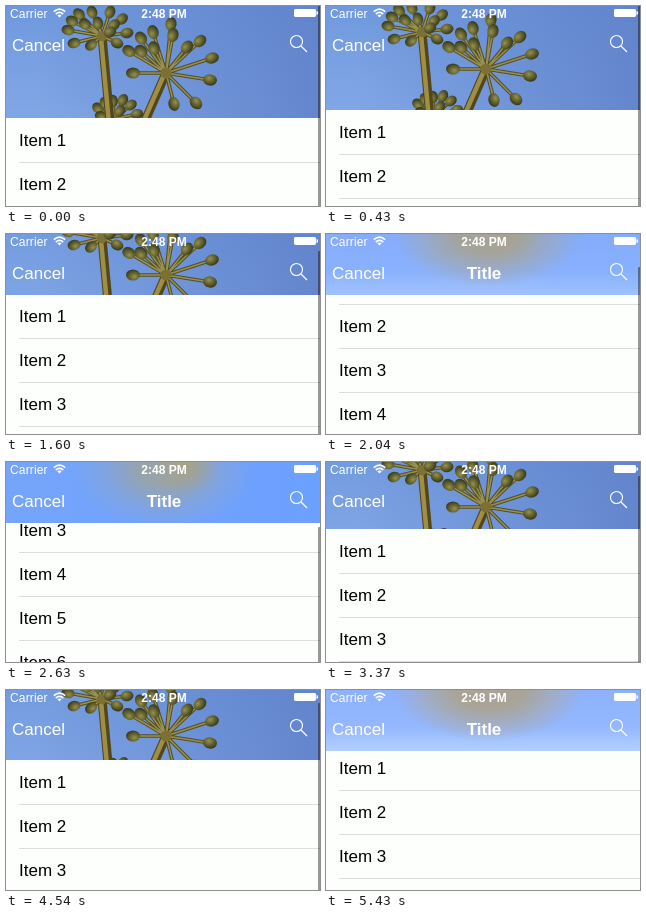
Recreate the animation shown at these times as an HTML page. Size 314x200 px, loop 5990 ms.

```html
<!DOCTYPE html>
<html lang="en">
<head>
<meta charset="utf-8">
<title>Collapsing header</title>
<style>
@property --scroll { syntax: "<number>"; inherits: true; initial-value: 0; }
@property --blur { syntax: "<number>"; inherits: true; initial-value: 0; }
@property --bar { syntax: "<number>"; inherits: true; initial-value: 1; }

html, body { margin: 0; width: 100%; height: 100%; overflow: hidden; background: #fdfffd; }
body {
  position: relative;
  font: 17px/43px "Liberation Sans", Arial, sans-serif;
  animation: scroll 5990ms infinite, blur 5990ms infinite, bar 5990ms infinite;
}

@keyframes scroll {
  0% { --scroll: 0; animation-timing-function: steps(7); }
  17.02% { --scroll: 28; animation-timing-function: steps(4); }
  26.7% { --scroll: 52; animation-timing-function: steps(4); }
  36.55% { --scroll: 120; animation-timing-function: steps(3); }
  43.9% { --scroll: 154; animation-timing-function: steps(1); }
  46.4% { --scroll: 146; animation-timing-function: steps(4); }
  56.25% { --scroll: 45; animation-timing-function: steps(2); }
  61.09% { --scroll: 20; animation-timing-function: steps(3); }
  68.44% { --scroll: 7; animation-timing-function: steps(2); }
  73.28% { --scroll: 30; animation-timing-function: steps(2); }
  78.29% { --scroll: 54; animation-timing-function: steps(1); }
  80.79%, 100% { --scroll: 56; }
}
@keyframes blur {
  0% { --blur: 0; }
  26.7% { --blur: 0; animation-timing-function: steps(2); }
  31.7% { --blur: 1; }
  51.4% { --blur: 1; animation-timing-function: steps(2); }
  56.25% { --blur: 0; }
  75.8% { --blur: 0; animation-timing-function: steps(2); }
  80.79%, 100% { --blur: 1; }
}
@keyframes bar {
  0% { --bar: 1; }
  83.3% { --bar: 1; animation-timing-function: steps(3); }
  90.64%, 100% { --bar: 0; }
}

#list { position: absolute; left: 13px; right: 0; top: calc((113 - var(--scroll)) * 1px); color: #000; }
#list div { height: 43px; border-bottom: 1px solid #dcdddd; }

#head {
  position: absolute; left: 0; top: 0; width: 314px; overflow: hidden;
  height: max(61px, (112 - var(--scroll)) * 1px);
}
#photo { position: absolute; left: 0; top: calc(var(--scroll) * -.5px); }
.haze { position: absolute; inset: 0; opacity: var(--blur); }
#near {
  background:
    radial-gradient(ellipse 95px 52px at 163px 0, #a9a497 0 35%, #a5abb6d0 65%, #a5b4d000),
    linear-gradient(#8db1fb, #94b7ff 60%, #b3d0ff);
}
#far {
  opacity: calc(var(--blur) * clamp(0, (var(--scroll) - 60) / 90, 1));
  background:
    radial-gradient(ellipse 34px 30px at 178px 2px, #aaa27fd0, #a0a59500),
    radial-gradient(ellipse 90px 62px at 158px 6px, #98a4ab 0 25%, #84a4d8c0 65%, #75a3f500),
    linear-gradient(90deg, #75a4fa, #6ca0ff);
}

.txt { position: absolute; color: #fff; line-height: 20px; white-space: nowrap; }
#title { left: 0; width: 316px; top: 30px; text-align: center; font-weight: bold; opacity: var(--blur); }
#nav { left: 6px; top: 30px; }
#carrier { left: 4px; top: -2px; font-size: 12px; letter-spacing: .15px; }
#clock { left: 0; width: 316px; top: -2px; text-align: center; font-size: 12px; font-weight: bold; }
#icons { position: absolute; left: 0; top: 0; }
#thumb {
  position: absolute; right: 0; width: 2px; height: 260px; border-radius: 1px 0 0 1px;
  top: calc(var(--scroll) * .47px - 7px);
  background: #0006; opacity: var(--bar);
}
</style>
</head>
<body>
<div id="list"></div>
<div id="head">
  <svg id="photo" width="314" height="190">
    <defs>
      <linearGradient id="sky" x2="0" y2="1">
        <stop stop-color="#6f99de"/><stop offset=".6" stop-color="#82a7e6"/><stop offset="1" stop-color="#86aae8"/>
      </linearGradient>
      <linearGradient id="shade">
        <stop offset=".1" stop-color="#5f80c9" stop-opacity="0"/><stop offset="1" stop-color="#5f80c9" stop-opacity=".85"/>
      </linearGradient>
      <radialGradient id="bud" cx=".4" cy=".35" r=".65">
        <stop stop-color="#96914f"/><stop offset=".5" stop-color="#666430"/><stop offset="1" stop-color="#383a1a"/>
      </radialGradient>
    </defs>
    <rect width="314" height="190" fill="url(#sky)"/>
    <rect width="314" height="190" fill="url(#shade)"/>
    <g id="plant" fill="none" stroke-linecap="round"></g>
  </svg>
  <div class="haze" id="near"></div>
  <div class="haze" id="far"></div>
</div>
<div class="txt" id="carrier">Carrier</div>
<div class="txt" id="clock">2:48 PM</div>
<div class="txt" id="nav">Cancel</div>
<div class="txt" id="title">Title</div>
<svg id="icons" width="314" height="61" fill="none" stroke="#fff">
  <path d="M47.8 5.6Q53.5 .8 59.2 5.6M49.8 8Q53.5 4.8 57.2 8" stroke-width="1.7"/>
  <path d="M51.3 9.3Q53.5 7.6 55.7 9.3L53.5 11.6Z" fill="#fff" stroke="none"/>
  <rect x="288" y="3" width="22" height="8" rx="1.4" fill="#fff" stroke="none"/>
  <path d="M311 5.5q1.6 1.5 0 3z" fill="#fff"/>
  <circle cx="290.5" cy="35.5" r="6" stroke-width="1.1"/>
  <path d="M295 40l6 6" stroke-width="1.3"/>
</svg>
<div id="thumb"></div>
<script>
const heads = [
  { hub: [108, 113], foot: [112, 190], width: 5, size: 5, buds: [
    [92, 102], [99, 97], [107, 95], [117, 94], [125, 99], [95, 110], [131, 108], [114, 105]] },
  { hub: [96, 30], foot: [111, 190], width: 9, size: 5.2, buds: [
    [73, 8], [86, 6], [104, 6], [66, 15], [79, 18], [116, 13], [62, 24], [68, 37],
    [85, 39], [108, 19], [121, 27], [111, 37], [92, 17], [104, 26]] },
  { hub: [160, 67], foot: [106, 190], width: 9, size: 5.6, buds: [
    [135, 32], [147, 26], [165, 18], [167, 29], [181, 41], [194, 35], [206, 52], [204, 74],
    [190, 97], [168, 98], [127, 67], [123, 45], [135, 45], [148, 42]] }
];

const plant = document.getElementById("plant");
function add(tag, attrs) {
  const el = document.createElementNS("http://www.w3.org/2000/svg", tag);
  for (const key in attrs) el.setAttribute(key, attrs[key]);
  plant.append(el);
}

for (const { hub, foot, width, size, buds } of heads) {
  const stem = `M${hub}L${foot}`;
  add("path", { d: stem, stroke: "#51461c", "stroke-width": width });
  add("path", { d: stem, stroke: "#a08e45", "stroke-width": width * .5, transform: "translate(-1.2)" });
  const rays = buds.map(bud => `M${hub}L${bud}`).join("");
  add("path", { d: rays, stroke: "#544e20", "stroke-width": 3.6 });
  add("path", { d: rays, stroke: "#989050", "stroke-width": 1.5 });
  add("circle", { cx: hub[0], cy: hub[1], r: size, fill: "#7d7034" });
  // buds stretch along their stalks
  for (const [cx, cy] of buds) {
    const tilt = Math.atan2(cy - hub[1], cx - hub[0]) * 180 / Math.PI;
    add("ellipse", {
      cx, cy, rx: size * 1.25, ry: size, fill: "url(#bud)",
      transform: `rotate(${tilt.toFixed(1)} ${cx} ${cy})`
    });
  }
}

const list = document.getElementById("list");
for (let i = 1; i <= 9; i++) {
  const row = document.createElement("div");
  row.textContent = "Item " + i;
  list.append(row);
}
</script>
</body>
</html>
```
